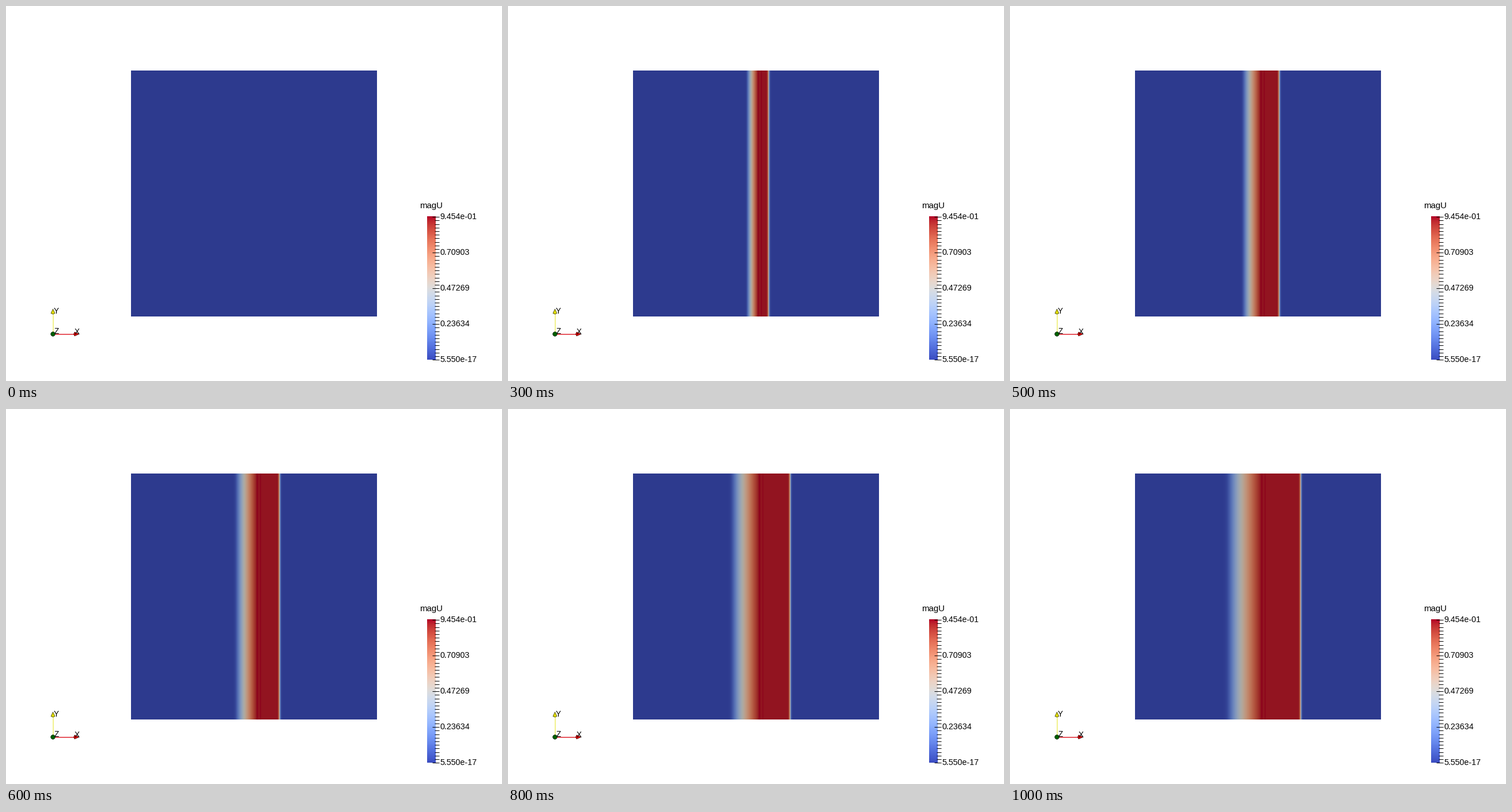
A matplotlib script for the animation above (1.1 s loop, 861x651 px).

```python
import numpy as np
import matplotlib.pyplot as plt
from matplotlib.animation import FuncAnimation
from matplotlib.patches import Circle, Polygon

W, H, DPI = 861, 651, 64
LEFT, RIGHT, TOP, BOTTOM = 217, 644, 112, 539
SHADE = np.array([0.78, 0.77, 0.74])  # scene lighting on the square
FRAMES = 11

fig = plt.figure(figsize=(W / DPI, H / DPI), dpi=DPI, facecolor="white")
ax = fig.add_axes([0, 0, 1, 1])
ax.set_axis_off()
cmap = plt.get_cmap("coolwarm")


def line(x0, y0, x1, y1, color="black", width=1):
    ax.plot([x0, x1], [y0, y1], color=color, lw=width * 72 / DPI,
            solid_capstyle="butt", zorder=3)


def label(x, y, text, px=14.3):
    ax.text(x, y, text, family="Liberation Sans", fontsize=px * 72 / DPI,
            color="black", va="baseline", ha="left", zorder=5)


def bump(x, center, width):
    return np.exp(-((x - center) / width) ** 2)


def wave(step):
    """Speed across the square: a widening fan, a plateau and a sharp front."""
    x = np.arange(LEFT, RIGHT) + 0.5
    if step == 0:
        return np.zeros_like(x)
    tail = 430 - 5.4 * step
    head = 430 + 7.5 * (1 - np.exp(-step / 4))
    front = 430.2 + 7.45 * step
    t = np.clip((x - tail) / (head - tail), -2, 1)
    fan = 0.04 * np.log1p(np.exp(t / 0.04))
    fan += 0.09 * np.sin(np.pi * np.clip(t, 0, 1))
    flat = 0.977 + 0.023 * (bump(x, head, 1.8) + bump(x, head + 6, 0.9))
    flat += 0.012 * bump(x, front - 4, 1.5)
    drop = 0.5 * (1 - np.tanh((x - front) / 1.8))
    return np.clip(np.where(x < head, fan, flat) * drop, 0, 1)


def shaded(step):
    return cmap(wave(step))[None, :, :3] * SHADE


def draw_legend():
    y0, y1 = 365, 614
    ramp = cmap(np.linspace(1, 0, y1 - y0))[:, None, :3]
    ax.imshow(ramp, extent=(731, 746, y1, y0), aspect="auto",
              interpolation="nearest", zorder=2)
    for i in range(41):
        y = int(y0 + 0.6 + i * 6.2) + 0.5
        line(740 if i % 10 == 0 else 744, y, 752, y)
    names = ["9.454e-01", "0.70903", "0.47269", "0.23634", "5.550e-17"]
    for i, name in enumerate(names):
        label(753, 370 + 62 * i, name)
    label(718.5, 351, "magU", 15)


def draw_axes():
    line(81.5, 535, 81.5, 567, "#eeee66", 1.5)
    line(84, 569.5, 118, 569.5, "#e0202a", 1.5)
    cone = dict(ec="black", lw=0.6, zorder=4)
    ax.add_patch(Polygon([(81.5, 526), (85, 533.5), (81.5, 535), (78, 533.5)],
                         fc="#e0dc00", **cone))
    ax.add_patch(Polygon([(127, 569.5), (119, 573), (117.5, 569.5), (119, 566)],
                         fc="#e00000", **cone))
    ax.add_patch(Circle((81.5, 569.5), 3.8, fc="#006000", **cone))
    label(83, 534, "Y", 13.5)
    label(119, 570, "X", 13.5)
    label(84, 569, "Z", 13.5)


field = ax.imshow(shaded(0), extent=(LEFT, RIGHT, BOTTOM, TOP), aspect="auto",
                  interpolation="nearest", zorder=1)
draw_legend()
draw_axes()
ax.set_xlim(0, W)
ax.set_ylim(H, 0)


def update(step):
    field.set_data(shaded(step))
    return [field]


anim = FuncAnimation(fig, update, frames=FRAMES, interval=100, repeat=True,
                     repeat_delay=0, blit=False)
plt.show()
```
